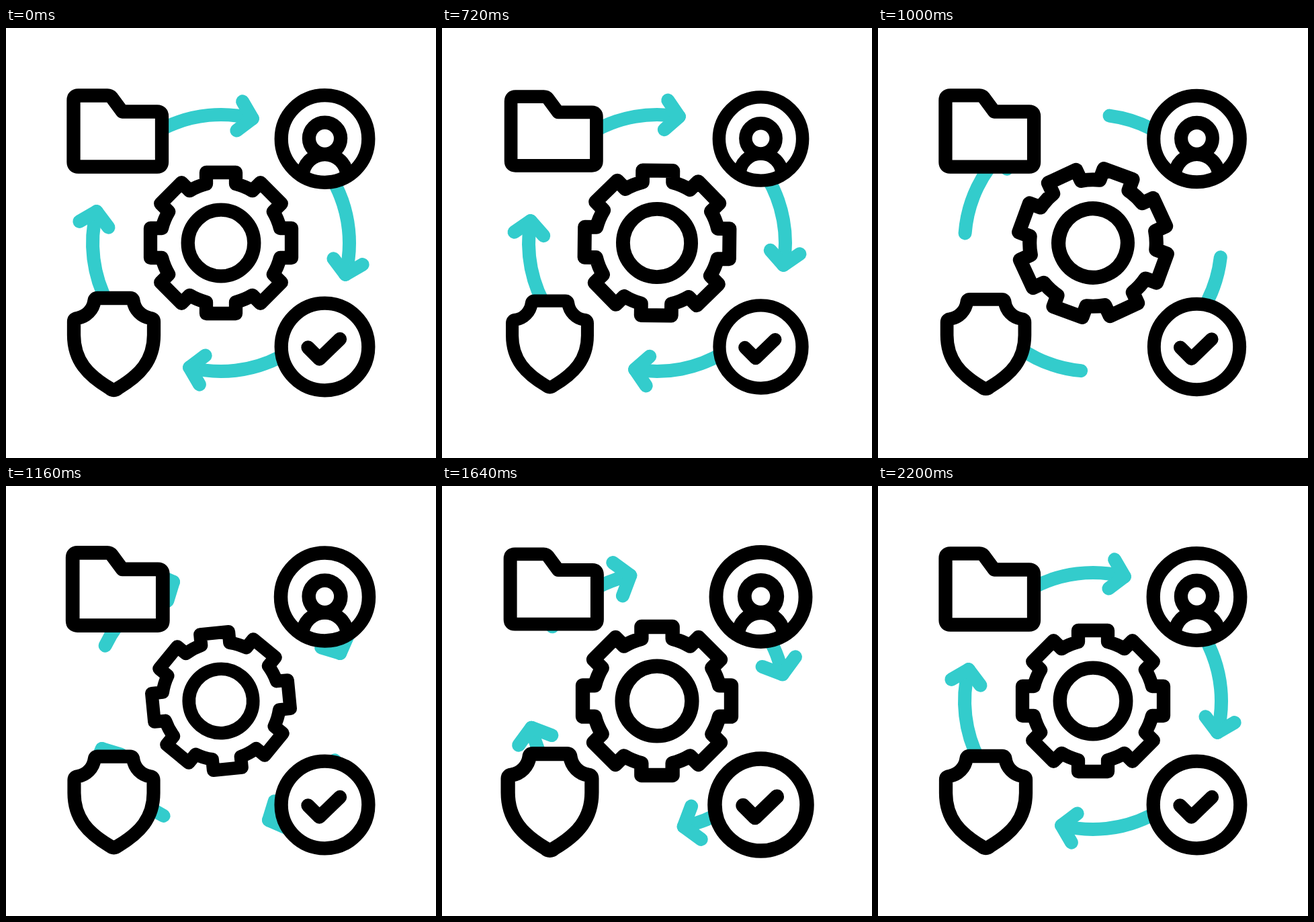
Recreate the animation shown at these times as an HTML page. Size 640x640 px, loop 2400 ms.

```html
<!DOCTYPE html>
<html lang="en">
<head>
<meta charset="utf-8">
<title>Workflow cycle</title>
<style>
  html, body { margin: 0; height: 100%; overflow: hidden; background: #fff; }
  svg { display: block; width: 100vw; height: 100vh; stroke-linejoin: round; }
  .icon { fill: #fff; stroke: #000; stroke-width: 20.3; }
  .line { fill: none; stroke-linecap: round; }
  #arrows { fill: none; stroke: #33cccc; stroke-width: 20; stroke-linecap: round; }
</style>
</head>
<body>
<svg viewBox="0 0 640 640">
  <g id="arrows"></g>
  <g id="gear" class="icon">
    <path id="teeth"/>
    <circle r="49.3"/>
  </g>
  <g id="folder" class="icon">
    <path d="M100.5 107.5q0-7 7-7H151q4 0 6.500 3L173 124.500H225q7 0 7 7V199.500q0 7-7 7H107.500q-7 0-7-7Z"/>
  </g>
  <g id="user" class="icon">
    <circle cx="474.5" cy="165" r="64.8"/>
    <path fill="none" d="M441.5 221a33 33 0 0 1 66 0"/>
    <circle cx="474.5" cy="164.3" r="23.6"/>
  </g>
  <g id="check" class="icon">
    <circle cx="474.5" cy="474.5" r="64.8"/>
    <path class="line" d="M449.5 475.5L466.5 492.5L497 463"/>
  </g>
  <g id="shield" class="icon">
    <path d="M136 402H185q4 0 4.500 4A30.500 30.500 0 0 0 215 432q5 .5 5 5V457C220 495 199 517 167 536Q160.500 542 154 536C122 517 101 495 101 457V437q0-4.500 5-5A30.500 30.500 0 0 0 131.500 406q.5-4 4.500-4Z"/>
  </g>
</svg>
<script>
const LOOP = 2400, RADIUS = 191, RAD = Math.PI / 180;
const $ = id => document.getElementById(id);

// Icons pulse one after another around their own centres.
const icons = [
  ['folder', 166.3, 153.5],
  ['user', 474.5, 165],
  ['check', 474.5, 474.5],
  ['shield', 160.5, 470.7]
];

const progress = (t, from, to) => Math.min(1, Math.max(0, (t - from) / (to - from)));
const easeOut = u => u + 0.3 * u * (1 - u);
const bump = u => Math.sin(Math.PI * u);

// Two shots: draw back a little, then swing forward.
const orbit = t => -15 * progress(t, 240, 640) + 90 * progress(t, 640, 1320)
                 - 15 * progress(t, 1320, 1750) + 30 * progress(t, 1750, 2200);
const widen = t => 5 * (bump(progress(t, 240, 720)) + bump(progress(t, 1440, 2200)));
const gearTurn = t => 65 * easeOut(progress(t, 240, 1000)) + 115 * easeOut(progress(t, 1000, 2200));
const gearSize = t => 1 - 0.065 * Math.sin(4 * Math.PI * progress(t, 240, 1940));
const iconSize = t => 1 - 0.06 * progress(t, 270, 480) + 0.12 * progress(t, 480, 1500)
                    - 0.12 * progress(t, 1500, 1720) + 0.06 * progress(t, 1720, 1940);

function gearPath() {
  const tooth = [[-22, -88], [-22, -105], [22, -105], [22, -88]];
  let d = '';
  for (let i = 0; i < 8; i++) {
    const c = Math.cos(i * 45 * RAD), s = Math.sin(i * 45 * RAD);
    tooth.forEach(([x, y], j) => {
      const join = j ? 'L' : i ? 'A90.7 90.7 0 0 1 ' : 'M';
      d += `${join}${x * c - y * s} ${x * s + y * c}`;
    });
  }
  return d + 'A90.7 90.7 0 0 1 -22 -88Z';
}

// An arrow rides the circle clockwise; its tip sits at the given angle from the top.
function arrow(tipAngle, tailLength, wide) {
  const a = tailLength * RAD, wing = 22 + wide;
  return `<g transform="translate(320 320) rotate(${tipAngle})">
    <path d="M${-RADIUS * Math.sin(a)} ${-RADIUS * Math.cos(a)}A${RADIUS} ${RADIUS} 0 0 1 0 ${-RADIUS}"/>
    <path d="M-19.5 ${-wing}L0 0L-19.5 ${wing}" transform="translate(0 ${-RADIUS}) rotate(${-2.7 - wide / 2})"/>
  </g>`;
}

function draw(t) {
  let arrows = '';
  for (let i = 0; i < 4; i++) arrows += arrow(14.2 + i * 90 + orbit(t), 39.6 + i, widen(t));
  $('arrows').innerHTML = arrows;

  $('gear').setAttribute('transform',
    `translate(320 320) rotate(${gearTurn(t)}) scale(${gearSize(t)})`);

  icons.forEach(([id, x, y], i) => {
    const size = iconSize(t - i * 80);
    $(id).setAttribute('transform', `translate(${x} ${y}) scale(${size}) translate(${-x} ${-y})`);
  });
}

$('teeth').setAttribute('d', gearPath());
const start = performance.now();
function frame() {
  draw((performance.now() - start) % LOOP);
  requestAnimationFrame(frame);
}
frame();
</script>
</body>
</html>
```
